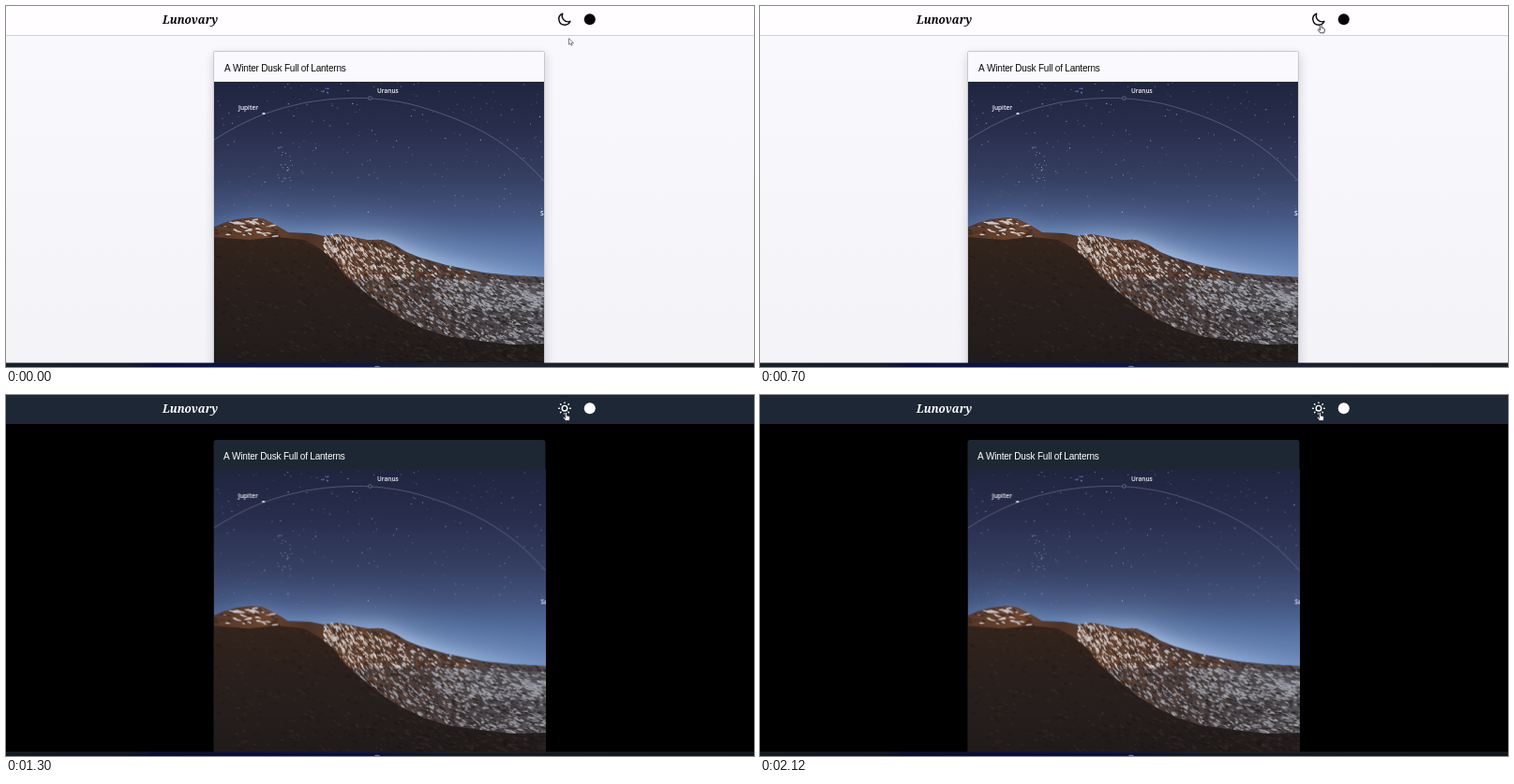
An HTML page with a canvas that plays this animation: 798 by 386 pixels, repeating every 2150 ms.

```html
<!DOCTYPE html>
<html lang="en">
<head>
<meta charset="utf-8">
<title>Photo feed theme switch</title>
<style>
html, body { margin: 0; width: 100%; height: 100%; overflow: hidden; background: #000; }
canvas { display: block; }
</style>
</head>
<body>
<canvas id="stage" width="798" height="386"></canvas>
<script>
const W = 798, H = 386, LOOP = 2150, SWITCH = 1300;
const ctx = document.getElementById('stage').getContext('2d');

// Photo geometry, in light-theme stage coordinates
const BOX = { x: 222, y: 81, w: 353, h: 301 };
const RIDGE = [[220, 237], [232, 232], [245, 228], [262, 226], [274, 227], [284, 232],
  [293, 237], [301, 242], [325, 243], [340, 246], [355, 244], [370, 247], [386, 250],
  [402, 250], [414, 255], [427, 263], [442, 269], [470, 277], [510, 285], [540, 288], [578, 290]];
const SHADE = [[220, 247], [260, 250], [290, 247], [318, 250], [334, 259], [350, 272],
  [362, 288], [380, 304], [400, 320], [420, 333], [445, 345], [470, 353], [505, 358], [540, 362], [578, 361]];
const ORBIT = [[215, 148], [222, 143], [245, 129], [275, 115], [320, 102], [365, 98],
  [400, 99], [440, 106], [500, 128], [545, 157], [580, 193]];

function seeded(seed) {
  return () => {
    seed = (seed * 1664525 + 1013904223) >>> 0;
    return seed / 4294967296;
  };
}

const lerp = (a, b, t) => a + (b - a) * t;
const ease = t => t * t * (3 - 2 * t);
const span = (t, a, b) => Math.min(1, Math.max(0, (t - a) / (b - a)));

function heightAt(pts, x) {
  let i = 1;
  while (i < pts.length - 1 && pts[i][0] < x) i++;
  const [x0, y0] = pts[i - 1], [x1, y1] = pts[i];
  return lerp(y0, y1, (x - x0) / (x1 - x0));
}

function gradient(g, x0, y0, x1, y1, stops) {
  const fill = g.createLinearGradient(x0, y0, x1, y1);
  stops.forEach(([at, color]) => fill.addColorStop(at, color));
  return fill;
}

function ground(g, pts, fill) {
  g.beginPath();
  pts.forEach(p => g.lineTo(...p));
  g.lineTo(580, 390);
  g.lineTo(218, 390);
  g.fillStyle = fill;
  g.fill();
}

function streak(g, x, y, rx, ry, angle, color) {
  g.fillStyle = color;
  g.beginPath();
  g.ellipse(x, y, rx, ry, angle, 0, 7);
  g.fill();
}

function sky(g, rnd) {
  g.fillStyle = gradient(g, 0, 81, 0, 290, [[0, '#20253f'], [0.25, '#292e4d'], [0.5, '#364063'],
    [0.67, '#43547e'], [0.82, '#546f9f'], [1, '#6d8bbb']]);
  g.fillRect(215, 75, 370, 230);

  // dawn light hugging the ridge
  const dawn = gradient(g, 222, 0, 575, 0, [[0, 'rgba(110,150,205,.2)'], [0.3, 'rgba(150,182,225,.5)'],
    [0.6, 'rgba(185,208,240,.85)'], [0.82, 'rgba(165,193,232,.65)'], [1, 'rgba(130,160,205,.35)']]);
  for (const blur of [24, 9]) {
    g.filter = `blur(${blur}px)`;
    ground(g, RIDGE, dawn);
  }
  g.filter = 'none';

  for (let i = 0; i < 210; i++) {
    const x = lerp(222, 575, rnd()), y = lerp(81, 225, Math.pow(rnd(), 1.25));
    g.globalAlpha = 0.2 + 0.6 * rnd() * rnd();
    streak(g, x, y, 0.6, 0.6, 0, '#d5def5');
  }
  // two denser star groups
  for (let i = 0; i < 22; i++) {
    g.globalAlpha = 0.5;
    streak(g, 297 + (rnd() - 0.5) * 14, 170 + (rnd() - 0.5) * 44, 0.6, 0.6, 0, '#cfd9f4');
    if (i < 8) streak(g, 340 + (rnd() - 0.5) * 8, 90 + (rnd() - 0.5) * 6, 0.9, 0.8, 0, '#7f9bea');
  }
  g.globalAlpha = 1;

  g.beginPath();
  ORBIT.slice(0, -1).forEach(([x, y], i) => {
    const [nx, ny] = ORBIT[i + 1];
    g.quadraticCurveTo(x, y, (x + nx) / 2, (y + ny) / 2);
  });
  g.lineTo(...ORBIT.at(-1));
  g.strokeStyle = 'rgba(165,172,192,.45)';
  g.lineWidth = 0.8;
  g.stroke();
  g.beginPath();
  g.arc(388.5, 98.5, 2, 0, 7);
  g.fillStyle = '#2b3152';
  g.fill();
  g.stroke();
  streak(g, 275, 115, 1.7, 1.1, 0, '#e8edf8');

  g.fillStyle = '#f4f5fa';
  g.font = '600 6.5px "Open Sans", sans-serif';
  g.fillText('Jupiter', 248, 111);
  g.fillText('Uranus', 396, 92.5);
  g.fillText('Saturn', 570, 224);
}

function summit(g, rnd) {
  for (let i = 0; i < 110; i++) {
    const x = lerp(222, 292, rnd()), top = heightAt(RIDGE, x);
    const snow = rnd() < (x > 240 && x < 280 ? 0.55 : 0.15);
    streak(g, x, top + 2 + rnd() * 16, 1.5 + rnd() * 3, 0.8, 0.5 - rnd() * 0.7,
      snow ? '#d0c8c8' : ['#5f3d2c', '#3f2b22'][i % 2]);
  }
}

// Sunlit snow above the shadow line, grey bowl below it
function slope(g, rnd) {
  for (let i = 0; i < 2600; i++) {
    const x = lerp(340, 577, rnd()), d = rnd();
    const top = heightAt(RIDGE, x), low = heightAt(SHADE, x);
    const y = lerp(top + 1, low, d), right = span(x, 350, 560);
    const lit = y < 291;
    const rim = x > 375 && y - top < 4 + 3 * right;
    const bowl = x > 455 && y > 292 && y < 318 + 8 * right;
    const hollow = x > 445 && !bowl && y < 341;
    const chance = rim ? 0.06 : bowl ? 0.85 : hollow ? 0.3 : lit ? 0.5 : 0.42;
    const snow = rnd() < chance;
    const pick = i % 2;
    const color = lit
      ? (snow ? ['#cdbeb6', '#dcd6d6'][pick] : ['#6b432e', '#3d2a23'][pick])
      : (snow ? ['#8f919b', '#a9abb3'][pick] : ['#2c2626', '#413a3c'][pick]);
    g.globalAlpha = 0.85;
    streak(g, x, y, 1 + rnd() * 2.4, 0.5 + rnd() * 0.6, lerp(0.85, 0.15, right) + rnd() * 0.3, color);
  }
  g.globalAlpha = 1;
}

function land(g, rnd) {
  ground(g, RIDGE, gradient(g, 222, 0, 575, 0, [[0, '#553828'], [0.16, '#6b452f'], [0.28, '#4d3326'],
    [0.42, '#654532'], [0.6, '#4f3d37'], [0.8, '#4c4648'], [1, '#55545a']]));
  summit(g, rnd);
  slope(g, rnd);

  ground(g, SHADE, gradient(g, 0, 247, 0, 382, [[0, '#33251d'], [0.25, '#2d211b'],
    [0.6, '#271f1d'], [1, '#201b1b']]));
  for (let i = 0; i < 520; i++) {
    const x = lerp(222, 575, rnd()), y = lerp(heightAt(SHADE, x) + 2, 382, rnd());
    g.globalAlpha = 0.3;
    streak(g, x, y, 1 + rnd() * 2.4, 0.5 + rnd() * 0.8, 0.4, i % 2 ? '#4a3a32' : '#171312');
  }
  g.globalAlpha = 1;
}

function makePhoto() {
  const c = document.createElement('canvas');
  c.width = W;
  c.height = H;
  const g = c.getContext('2d'), rnd = seeded(41);
  sky(g, rnd);
  land(g, rnd);
  return c;
}

const photo = makePhoto();
const MOON = new Path2D('M20.354 15.354A9 9 0 0 1 8.646 3.646 9.003 9.003 0 0 0 12 21a9.003 9.003 0 0 0 8.354-5.646z');
const ARROW = new Path2D('M0 0V6.2L1.5 4.9L2.6 7.3L3.6 6.8L2.6 4.6H4.5Z');
const HAND = new Path2D('M-.9 .8Q0 -.5 .9 .8V3.6L3.4 4.3Q4.4 4.7 4.1 6L3.4 9H-.6L-3 5.8Q-2.9 4.6 -1.8 5.1L-.9 5.9Z');

function icons(dark, ink) {
  ctx.strokeStyle = ctx.fillStyle = ink;
  ctx.lineCap = ctx.lineJoin = 'round';
  ctx.save();
  ctx.translate(596, 14.2);
  ctx.scale(0.7, 0.7);
  ctx.lineWidth = 2;
  if (dark) {
    ctx.beginPath();
    ctx.arc(0, 0, 4, 0, 7);
    for (let i = 0; i < 8; i++) {
      const c = Math.cos(i * Math.PI / 4), s = Math.sin(i * Math.PI / 4);
      ctx.moveTo(c * 8, s * 8);
      ctx.lineTo(c * 9, s * 9);
    }
    ctx.stroke();
  } else {
    ctx.translate(-11.8, -12.3);
    ctx.stroke(MOON);
  }
  ctx.restore();
  ctx.beginPath();
  ctx.arc(622.8, 14.2, 6, 0, 7);
  ctx.fill();
}

function header(dark) {
  const ink = dark ? '#fff' : '#050505';
  ctx.fillStyle = dark ? '#1d2735' : '#fffdff';
  ctx.fillRect(0, 0, W, 31);
  if (!dark) {
    ctx.fillStyle = '#d2d2d6';
    ctx.fillRect(0, 31, W, 1);
  }
  ctx.fillStyle = ink;
  ctx.font = 'italic 600 11.8px "Noto Serif", serif';
  ctx.fillText('Lunovary', 167, 19);
  icons(dark, ink);
}

function card(dark) {
  const left = dark ? 221.5 : 222, top = dark ? 48 : 48.5, width = dark ? 354 : 353;
  ctx.save();
  if (!dark) {
    ctx.shadowColor = 'rgba(30,30,60,.22)';
    ctx.shadowBlur = 11;
    ctx.shadowOffsetY = 4;
  }
  ctx.fillStyle = dark ? '#1d2733' : '#faf9fd';
  ctx.beginPath();
  ctx.roundRect(left, top, width, 360, dark ? 3 : 1);
  ctx.fill();
  ctx.restore();

  ctx.fillStyle = dark ? '#fff' : '#0a0a0a';
  ctx.font = '10px "Liberation Sans", Arial, sans-serif';
  ctx.letterSpacing = '-0.2px';
  ctx.fillText('A Winter Dusk Full of Lanterns', dark ? 232 : 233, dark ? 69 : 70);
  ctx.letterSpacing = '0px';

  const { x, y, w, h } = BOX;
  if (dark) ctx.drawImage(photo, x, y, w, h, left, 80, width, h + 1);
  else {
    ctx.drawImage(photo, x, y, w, h, x, y, w, h);
    ctx.strokeStyle = '#c8c8cd';
    ctx.lineWidth = 1;
    ctx.beginPath();
    ctx.roundRect(221.5, 48.5, 353, 360, 1);
    ctx.stroke();
  }
}

function taskbar(dark) {
  ctx.fillStyle = gradient(ctx, 0, 0, W, 0, [[0, '#182129'], [0.16, '#151d29'], [0.2, '#0a1142'],
    [0.46, '#0b1550'], [0.53, '#131c38'], [0.62, '#1b232e'], [1, '#171d22']]);
  ctx.fillRect(0, 381.5, W, 4.5);
  if (dark) {
    ctx.fillStyle = 'rgba(0,0,0,.25)';
    ctx.fillRect(0, 383, W, 3);
  }
  streak(ctx, 396, 386, 3, 1.3, 0, '#6f7a96');
}

function pointer(t) {
  const a = ease(span(t, 90, 400)), b = ease(span(t, 520, 850));
  const x = 600.5 - a - 2 * b, y = 35 - 13.5 * a - 3 * b;
  ctx.save();
  ctx.translate(x, y);
  ctx.lineJoin = 'round';
  ctx.lineWidth = 0.9;
  ctx.fillStyle = '#fff';
  const hand = y < 27;
  ctx.strokeStyle = hand ? '#333' : '#777';
  const shape = hand ? HAND : ARROW;
  ctx.fill(shape);
  ctx.stroke(shape);
  ctx.restore();
}

function draw(t) {
  const dark = t >= SWITCH;
  ctx.fillStyle = dark ? '#000' : gradient(ctx, 0, 32, 0, 382, [[0, '#f9f8fc'], [1, '#f4f3f8']]);
  ctx.fillRect(0, 0, W, H);
  header(dark);
  card(dark);
  taskbar(dark);
  pointer(t);
}

const start = performance.now();
function tick() {
  draw((performance.now() - start) % LOOP);
  requestAnimationFrame(tick);
}
tick();
</script>
</body>
</html>
```
